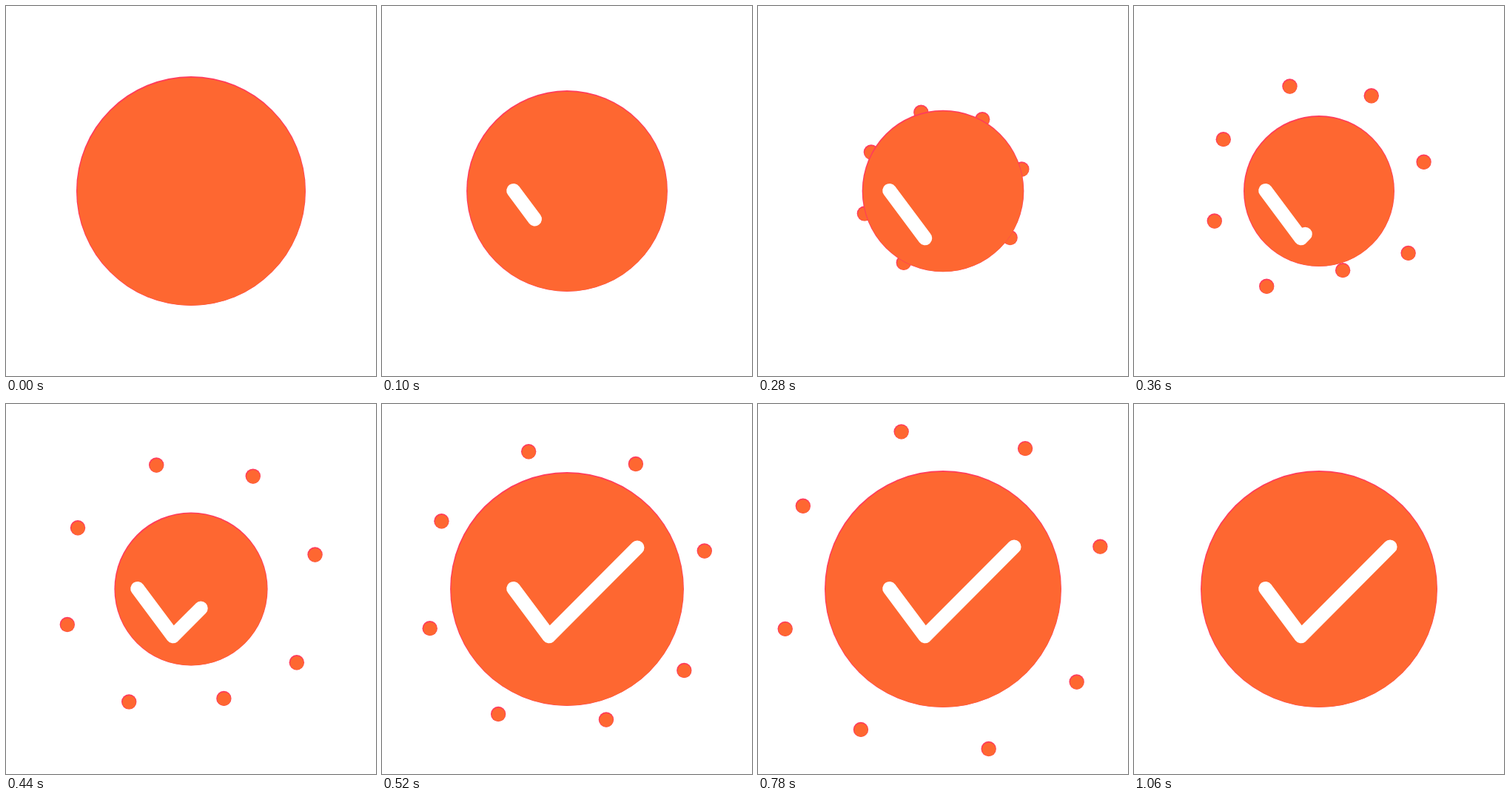
An HTML page with a canvas for the animation above (1.14 s loop, 500 px wide and 500 px high).

```html
<!DOCTYPE html>
<html>
<head>
<meta charset="utf-8">
<style>
  html, body { margin: 0; width: 100%; height: 100%; overflow: hidden; background: #fff; }
  canvas { display: block; }
</style>
</head>
<body>
<canvas id="stage" width="500" height="500"></canvas>
<script>
const ctx = document.getElementById('stage').getContext('2d');
const LOOP = 1140, STEP = 20, CENTER = 250;
const ORANGE = '#fe6731', RIM = '#ff3b5c';

// Heading and later clockwise turn of each dot, in degrees.
const dots = [
  { heading: 254.4, turn: 1 },
  { heading: 298.8, turn: 2 },
  { heading: 344.5, turn: 0.5 },
  { heading: 34.8, turn: 0 },
  { heading: 73.3, turn: 1, start: 207, span: 294, reach: 234 },
  { heading: 118.8, turn: 2 },
  { heading: 164, turn: 2.4 },
  { heading: 208.4, turn: 3 }
];

const ramp = (t, from, to) => Math.min(1, Math.max(0, (t - from) / (to - from)));
const smooth = p => p * p * (3 - 2 * p);
const cubicInOut = p => p < 0.5 ? 4 * p ** 3 : 1 - 4 * (1 - p) ** 3;

function fillCircle(x, y, r, color) {
  ctx.fillStyle = color;
  ctx.beginPath();
  ctx.arc(x, y, Math.max(0, r), 0, 2 * Math.PI);
  ctx.fill();
}

function rimmedCircle(x, y, r) {
  fillCircle(x, y, r, RIM);
  fillCircle(x + 0.3, y + 0.7, r - 1, ORANGE);
}

function drawDot({ heading, turn, start = 102, span = 337, reach = 228 }, t) {
  const distance = reach * Math.tanh(Math.max(0, t - start) / span);
  const angle = (heading + turn * smooth(ramp(t, 520, 900))) * Math.PI / 180;
  const radius = 10.2 * (1 - ramp(t, 880, 1060));
  rimmedCircle(CENTER + distance * Math.cos(angle), CENTER + distance * Math.sin(angle), radius);
}

// The disc shrinks, then springs back to full size.
function drawDisc(t) {
  const shrink = (1 - ramp(t, -24, 404)) ** 1.5;
  const grow = cubicInOut(ramp(t, 404, 550));
  rimmedCircle(CENTER, CENTER, 100 + 60 * (shrink + grow));
}

// The short stroke slows to a stop, then the long one speeds up.
function drawCheck(t) {
  const short = 1 - (1 - ramp(t, 0, 273)) ** 2;
  const long = ramp(t, 270, 521) ** 3;
  const length = 80.4 * short + 171 * long;
  if (!length) return;
  ctx.strokeStyle = '#fff';
  ctx.lineWidth = 19;
  ctx.lineCap = ctx.lineJoin = 'round';
  ctx.setLineDash([length, 1000]);
  ctx.beginPath();
  ctx.moveTo(177.7, 249.4);
  ctx.lineTo(225.7, 313.8);
  ctx.lineTo(346.1, 192.9);
  ctx.stroke();
}

function draw(t) {
  ctx.clearRect(0, 0, 500, 500);
  dots.forEach(dot => drawDot(dot, t));
  drawDisc(t);
  drawCheck(t);
}

const begin = performance.now();
function tick() {
  const t = (performance.now() - begin) % LOOP;
  draw(Math.floor(t / STEP) * STEP);
  requestAnimationFrame(tick);
}
tick();
</script>
</body>
</html>
```
